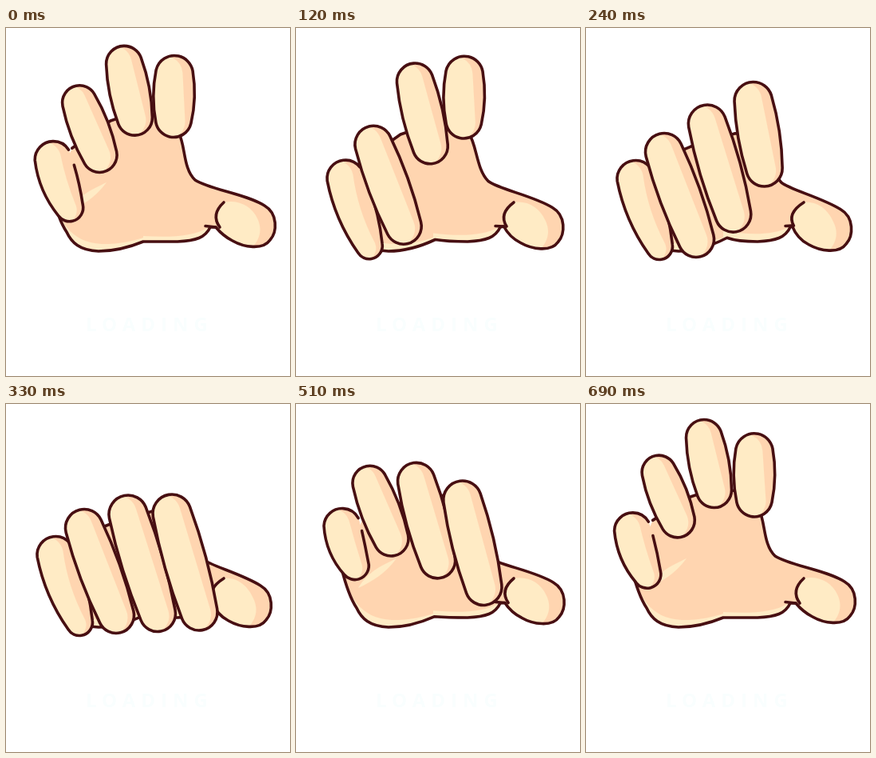
Recreate the animation shown at these times as an HTML page with a canvas. Size 356 px wide and 435 px high, loop 720 ms.

```html
<!DOCTYPE html>
<html lang="en">
<head>
<meta charset="utf-8">
<title>Loading</title>
<style>
html, body { margin: 0; width: 356px; height: 435px; overflow: hidden; background: #fff; }
canvas { display: block; }
</style>
</head>
<body>
<canvas id="stage" width="356" height="435"></canvas>
<script>
const ctx = document.getElementById('stage').getContext('2d');
const LINE = '#470f12', LIGHT = '#ffebc5', SHADE = '#ffd5b0';
const LOOP = 720, STEP = 30;
const TIMES = [0, 120, 240, 330, 450, 570, 690];

// Each end of a finger is [x, y, radius]; curl holds 0 (open) to 1 (closed) at TIMES.
const fingers = [
  { open: [[57.5, 150, 23], [72, 195, 17.5]], closed: [[62, 188.5, 23], [92, 273, 16.5]],
    curl: [.38, .99, 1, 1, .27, .01, .23], joined: true },
  { open: [[90.5, 76, 21], [111.5, 129, 21.5]], closed: [[98, 155, 23.5], [138, 264, 22.5]],
    curl: [.22, .88, 1, 1, .67, .02, .12] },
  { open: [[148, 42, 22.5], [160.5, 107.5, 22]], closed: [[153, 138, 24], [190, 262, 22.5]],
    curl: [.03, .26, .81, 1, .95, .15, 0] },
  { open: [[211, 58, 23.5], [210, 114, 22.5]], closed: [[208, 137, 24], [242, 260, 23]],
    curl: [0, .01, .42, 1, 1, .45, .03] }
];
const palmCurl = [0, .5, .95, 1, .6, 0, 0];

const lerp = (a, b, k) => a + (b - a) * k;
const mix = (p, q, k) => p.map((v, i) => lerp(v, q[i], k));
const polar = ([x, y, r], angle) => [x + r * Math.cos(angle), y + r * Math.sin(angle)];

// Periodic monotone cubic through the values at TIMES.
function sample(values, t) {
  const n = TIMES.length;
  const time = i => TIMES[(i + n) % n] + Math.floor(i / n) * LOOP;
  const value = i => values[(i + n) % n];
  const rise = i => (value(i + 1) - value(i)) / (time(i + 1) - time(i));
  const slope = i => {
    const a = rise(i - 1), b = rise(i);
    return a * b <= 0 ? 0 : 2 * a * b / (a + b);
  };
  let i = n - 1;
  while (time(i) > t) i--;
  const h = time(i + 1) - time(i), u = (t - time(i)) / h, v = 1 - u;
  return v * v * (1 + 2 * u) * value(i) + u * u * (3 - 2 * u) * value(i + 1)
    + h * u * v * (v * slope(i) - u * slope(i + 1));
}

// Rounded finger whose sides bulge by the given pixels; gap leaves the upper right side open.
function fingerPath(top, base, leftBulge, rightBulge, gap = 0) {
  const path = new Path2D(), quarter = Math.PI / 2;
  const a = Math.atan2(base[1] - top[1], base[0] - top[0]);
  const length = Math.hypot(base[0] - top[0], base[1] - top[1]);
  const middle = mix(top, base, .5);
  const tilt = bulge => Math.atan(4 * bulge / length);
  const control = (angle, bulge) => polar([middle[0], middle[1], middle[2] + 2 * bulge], angle);
  const left = tilt(leftBulge), right = tilt(rightBulge);

  const from = polar(top, a - quarter - right), to = polar(base, a - quarter + right);
  const bend = control(a - quarter, rightBulge), rest = mix(bend, to, gap);
  path.moveTo(...mix(mix(from, bend, gap), rest, gap));
  path.quadraticCurveTo(...rest, ...to);
  path.arc(base[0], base[1], base[2], a - quarter + right, a + quarter - left);
  path.quadraticCurveTo(...control(a + quarter, leftBulge), ...polar(top, a + quarter + left));
  path.arc(top[0], top[1], top[2], a + quarter + left, a + 3 * quarter - right - (gap && .15));
  if (!gap) path.closePath();
  return path;
}

function fill(path, color) {
  ctx.fillStyle = color;
  ctx.fill(path);
}

function shaded(shape, lights, outline = shape) {
  ctx.save();
  ctx.clip(shape);
  fill(shape, SHADE);
  lights.forEach(light => fill(light, LIGHT));
  ctx.restore();
  ctx.stroke(outline);
}

function drawFinger({ open, closed, curl, joined }, t) {
  const k = sample(curl, t);
  const [top, base] = open.map((end, i) => mix(end, closed[i], k));
  const bulges = joined ? [5, 4 * k] : [3, 3];
  const light = fingerPath([top[0] - 13, top[1], top[2]], [base[0] - 8, base[1] + 3, base[2]],
    9, joined ? -4 * k : 0);
  shaded(fingerPath(top, base, ...bulges), [light],
    joined ? fingerPath(top, base, ...bulges, .25) : undefined);
}

function drawPalm(t) {
  const q = sample(palmCurl, t), p = sample(fingers[0].curl, t);
  const dx = -5 * q, dy = 5 * q;
  const thumbBase = `${263 + dx} ${249 - 2 * q}`;
  const underside = `C${322 + dx} ${278 + dy} ${298 + dx} ${274 + dy} ${284 + dx} ${266 + dy}
    C${276 + dx} ${262 + dy} ${268 + dx} ${255 + dy} ${thumbBase}`;
  const palm = new Path2D(`M${85 - 6 * p} ${138 + 32 * p}
    L131 ${116 + 34 * q} L137 ${114 + 34 * q} L187 ${108 + 25 * q} L217 132
    C${225 + 4 * q} 148 ${222 + 8 * q} 176 ${237 + 8 * q} ${190 + 3 * q}
    C255 202 ${300 + dx} ${207 + dy} ${324 + dx} ${222 + dy}
    C${341 + dx} ${232 + dy} ${340 + dx} ${255 + dy} ${331 + dx} ${265 + dy}
    ${underside} L256 249
    C250 262 238 266 215 267 C205 267 190 267 ${172 + 5 * q} ${267 - 5 * q}
    C150 276 130 279 116 279 C92 278 82 268 76 255 C68 243 62 225 57 205`);
  const crease = `M273 218 C${262 + dx} 228 ${260 + dx} 238 ${268 - 8 * q} ${249 - 2 * q}`;
  shaded(palm, [
    new Path2D('M57 205C66 240 80 268 120 270C145 271 165 264 172 262V290H50Z'),
    new Path2D(`M172 ${260 - 7 * q}C205 ${262 - 3 * q} 235 ${261 - 2 * q} 254 249V275H172Z`),
    new Path2D('M126 193C105 203 90 210 78 230C95 222 112 212 126 193Z'),
    new Path2D(`${crease} L${thumbBase} L${284 + dx} ${276 + dy} L${308 + dx} ${275 + dy}
      C${318 + dx} ${265 + dy} ${322 + dx} ${252 + dy} ${315 + dx} ${238 + dy}
      C${308 + dx} ${222 + dy} 290 ${214 + dy / 2} 273 218Z`)
  ]);
  ctx.stroke(new Path2D(crease));
  ctx.stroke(new Path2D(`M250 247.5L${thumbBase}`));
}

function draw(now) {
  const t = Math.floor(now % LOOP / STEP) * STEP;
  ctx.fillStyle = '#fff';
  ctx.fillRect(0, 0, 356, 435);
  ctx.strokeStyle = LINE;
  ctx.lineWidth = 3.6;
  ctx.lineCap = ctx.lineJoin = 'round';
  drawPalm(t);
  fingers.forEach(finger => drawFinger(finger, t));
  ctx.font = '700 24px "Open Sans", sans-serif';
  ctx.letterSpacing = '7px';
  ctx.fillStyle = '#f9fefe';
  ctx.fillText('LOADING', 100, 379);
}

const start = performance.now();
function tick() {
  draw(performance.now() - start);
  requestAnimationFrame(tick);
}
tick();
</script>
</body>
</html>
```
